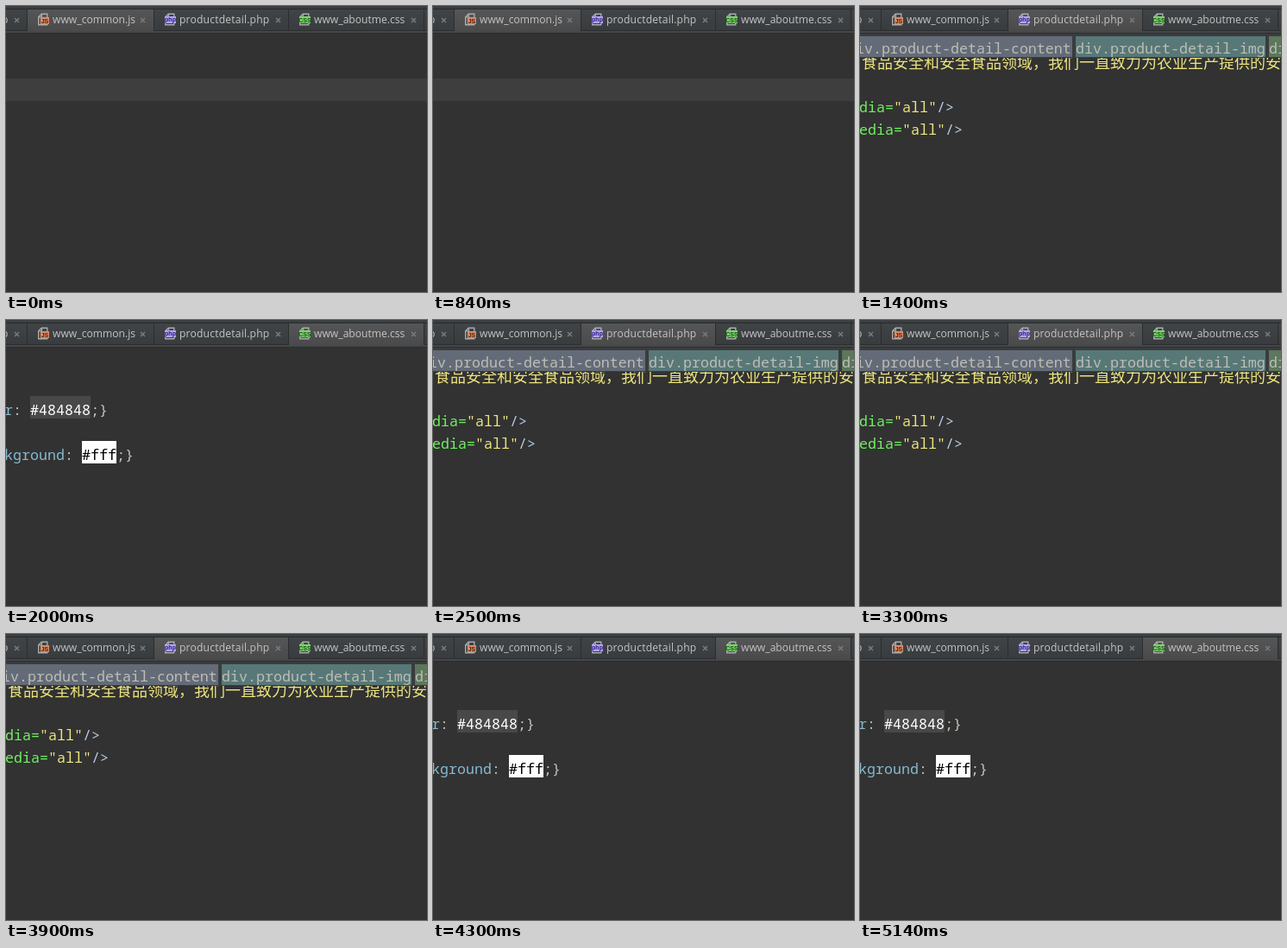
These frames come from a looping animation (488 px wide and 331 px high, 5700 ms). An HTML page:

```html
<!DOCTYPE html>
<html lang="en">
<head>
<meta charset="utf-8">
<title>Editor tabs</title>
<style>
  html, body { margin: 0; width: 100%; height: 100%; overflow: hidden; background: #323232; }
  svg { display: block; width: 488px; height: 331px; }
  text { white-space: pre; }

  .tab { font: 12.1px "Open Sans", "Noto Sans", sans-serif; fill: #c4c4c4; }
  .badge { font: bold 7px "Liberation Sans", Arial, sans-serif; text-anchor: middle; }
  .code { font: 16.667px "Noto Sans Mono", monospace; }
  .cjk { font: 18px "Noto Sans CJK SC", "Noto Sans CJK", sans-serif; }

  .str { fill: #ece47e; }
  .attr { fill: #6ef05f; }
  .tag { fill: #b4cbe6; }
  .prop { fill: #86b9d2; }
  .punct { fill: #c6c6bd; }

  .js, .php, .css { animation: 5.7s step-end infinite; }
  .js { animation-name: js; }
  .php { animation-name: php; }
  .css { animation-name: css; }
  .caret { animation: caret 5.7s step-end infinite; }

  @keyframes js {
    0%, 49.1228% { visibility: visible; }
    24.5614%, 57.8947%, 100% { visibility: hidden; }
  }
  @keyframes php {
    0%, 35.0877%, 49.1228%, 75.4386%, 100% { visibility: hidden; }
    24.5614%, 43.8596%, 57.8947% { visibility: visible; }
  }
  @keyframes css {
    0%, 43.8596% { visibility: hidden; }
    35.0877%, 75.4386%, 100% { visibility: visible; }
  }
  @keyframes caret {
    0% { transform: translateY(84px); }
    49.1228%, 100% { transform: translateY(58px); }
  }
</style>
</head>
<body>
<svg viewBox="0 0 488 331">
  <defs>
    <linearGradient id="idle" x2="0" y2="1">
      <stop stop-color="#404446"/><stop offset="1" stop-color="#393c3e"/>
    </linearGradient>
    <linearGradient id="active" x2="0" y2="1">
      <stop stop-color="#555657"/><stop offset="1" stop-color="#4a4a4b"/>
    </linearGradient>
    <clipPath id="editor"><path d="M0 60H488V331H0z"/></clipPath>
    <g id="doc" fill="none" stroke="#a8abad" stroke-width="1.4">
      <path d="M.7 13.3V4.2L4.2 .7H10.8V13.3z"/>
      <path d="M.7 4.4H4.4V.7"/>
    </g>
    <path id="close" d="M-2.5 -2.5L2.5 2.5M2.5 -2.5L-2.5 2.5" stroke="#787b7d" stroke-width="1.5"/>
  </defs>

  <rect width="488" height="331" fill="#323232"/>

  <!-- tab bar -->
  <rect width="488" height="4" fill="#3c3f41"/>
  <rect y="3" width="488" height="1" fill="#292b2c"/>
  <rect y="4" width="488" height="24" fill="url(#idle)"/>
  <rect class="js" x="25" y="4" width="146" height="25" fill="url(#active)"/>
  <rect class="php" x="172" y="4" width="155" height="25" fill="url(#active)"/>
  <rect class="css" x="328" y="4" width="156" height="25" fill="url(#active)"/>
  <path d="M24.5 4V28M171.5 4V28M327.5 4V28M484.5 4V28" stroke="#2b2d2e"/>
  <rect y="28" width="488" height="4" fill="#45474a"/>
  <path d="M0 28.5H488M0 31.5H488" stroke="#2b2d2e"/>
  <rect class="js" x="25" y="28" width="146" height="1" fill="#4a4a4b"/>
  <rect class="php" x="172" y="28" width="155" height="1" fill="#4a4a4b"/>
  <rect class="css" x="328" y="28" width="156" height="1" fill="#4a4a4b"/>

  <use href="#doc" x="37" y="8.5"/>
  <rect x="40" y="13" width="10" height="8" fill="#e08a62"/>
  <text class="badge" x="45" y="19.5" fill="#4a1f10">JS</text>
  <use href="#doc" x="184" y="8.5"/>
  <rect x="184" y="12" width="13" height="8" fill="#b3a4f0"/>
  <text class="badge" x="190.5" y="18" fill="#2a1a80">php</text>
  <use href="#doc" x="340" y="8.5"/>
  <rect x="340" y="12" width="13" height="8" fill="#7ed36c"/>
  <text class="badge" x="346.5" y="18.5" fill="#145014">CSS</text>

  <g class="tab">
    <text x="-5" y="20">p</text>
    <text x="54" y="20">www_common.js</text>
    <text x="201" y="20" letter-spacing=".2">productdetail.php</text>
    <text x="357" y="20">www_aboutme.css</text>
  </g>
  <use href="#close" x="12.5" y="16.5"/>
  <use href="#close" x="158.5" y="16.5"/>
  <use href="#close" x="315.5" y="16.5"/>
  <use href="#close" x="472.5" y="16.5"/>

  <!-- script -->
  <g class="js"><rect class="caret" width="488" height="26" fill="#3e3e3e"/></g>

  <!-- markup -->
  <g class="php code">
    <g clip-path="url(#editor)">
      <text class="cjk str" x="2" y="72">食品安全和安全食品领域，我们一直致力为农业生产提供的安全</text>
    </g>
    <rect y="32" width="488" height="28" fill="#3a3c3d"/>
    <rect y="35" width="246" height="24" fill="#646b78"/>
    <rect x="250" y="35" width="220" height="24" fill="#587878"/>
    <rect x="474" y="35" width="14" height="24" fill="#5c775c"/>
    <g fill="#bdbdb5">
      <text x="-5" y="55">iv.product-detail-content</text>
      <text x="250" y="55">div.product-detail-img</text>
      <text x="474" y="55">div</text>
    </g>
    <text x="-1" y="123"><tspan class="attr">dia=</tspan><tspan class="str">"all"</tspan><tspan class="tag">/&gt;</tspan></text>
    <text x="-1" y="149"><tspan class="attr">edia=</tspan><tspan class="str">"all"</tspan><tspan class="tag">/&gt;</tspan></text>
  </g>

  <!-- stylesheet -->
  <g class="css code">
    <rect x="28" y="88" width="70" height="26" fill="#484848"/>
    <rect x="88" y="140" width="40" height="26" fill="#fff"/>
    <text x="-2" y="110"><tspan class="prop">r</tspan><tspan class="punct">: </tspan><tspan fill="#fff">#484848</tspan><tspan class="punct">;}</tspan></text>
    <text x="-2" y="162"><tspan class="prop">kground</tspan><tspan class="punct">: </tspan><tspan fill="#000">#fff</tspan><tspan class="punct">;}</tspan></text>
  </g>
</svg>
</body>
</html>
```
